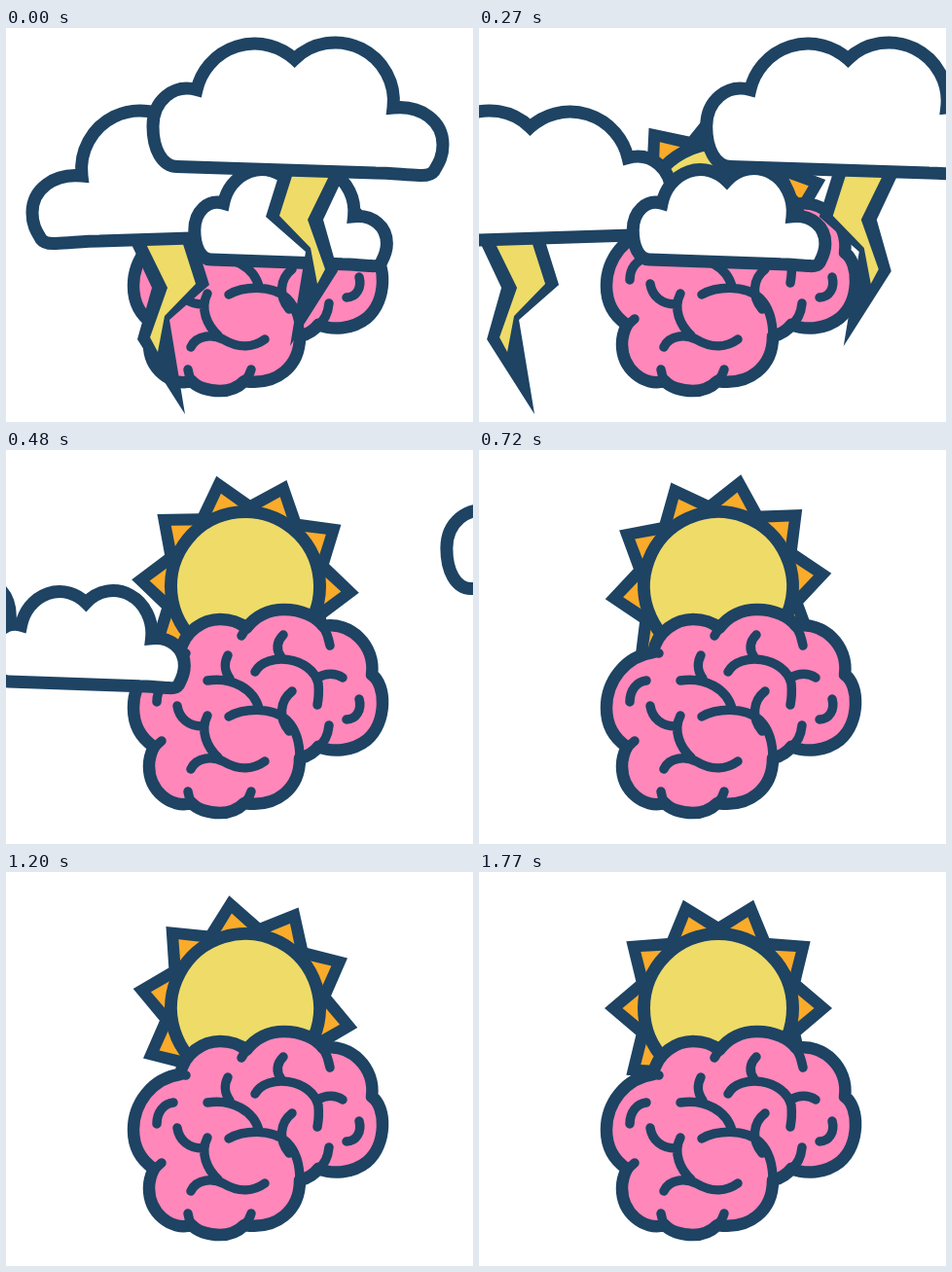
An HTML page with a canvas for the animation above (1.8 s loop, 480 by 405 pixels).

```html
<!DOCTYPE html>
<html lang="en">
<head>
<meta charset="utf-8">
<title>Brain weather</title>
<style>
html, body { margin: 0; width: 100%; height: 100%; overflow: hidden; background: #fff; }
canvas { display: block; }
</style>
</head>
<body>
<canvas id="stage" width="480" height="405"></canvas>
<script>
const ctx = document.getElementById('stage').getContext('2d');
const LOOP = 1800, STEP = 30;
const NAVY = '#1e4363', PINK = '#ff87b9', YELLOW = '#eedb68', ORANGE = '#faab2a';

const cloud = new Path2D(`M176 142.5C160 142 151 124 151 101C151 75 172 57 196 63.5
  A61 61 0 0 1 296.5 32A60 60 0 0 1 398 82C427 79 449 96 449 120
  C449 133 444 140 440 147C437 151 433 152 425 151.5C410 151 395 149 380 149Z`);
const smallCloud = new Path2D();
smallCloud.addPath(cloud, new DOMMatrix([0.663, 0, 0, 0.732, 93.7, 133.7]));

const boltEdge = new Path2D('M350 146L282 146L267 194L308 230L292 327L341 250L326 197Z');
const boltCore = new Path2D('M335 146L296 146L281 193L313 226L320 263L328 248L310 197Z');

const brain = new Path2D(`M179 208C183 186 203 174 220 174C231 174 240 177 247 183
  C257 170 271 164 286 164C303 164 319 171 326 181C354 176 380 201 376 231
  C391 241 392 280 371 298C356 310 335 311 321 305C316 312 309 315 302 317
  C302 348 278 368 245 363C238 370 230 373 220 373C207 373 196 369 191 363
  C169 369 147 350 147 325C147 317 149 311 152 305C140 297 131 284 131 265
  C131 238 150 212 179 208Z`);
const folds = new Path2D(`M179 208L185 209M242 191L247 183M326 181Q331 190 333 201
  M332 283C331 293 328 300 321 305M160 299Q154 304 152 308
  M187 351Q188 358 191 363M252 351Q250 358 245 363
  M228 211C224 219 224 226 230 235M207 237C233 233 255 246 260 266
  M285 190C278 197 277 205 283 213M256 228C268 207 314 212 321 240Q322 252 320 262
  M321 234C328 229 339 229 346 234
  M294 248C281 258 280 276 291 289M363 256C366 267 360 277 350 277
  M155 259C155 247 162 238 172 237M176 263C178 276 188 284 202 284
  M207 273C199 289 207 306 218 316
  M190 328C196 315 213 315 223 320C240 330 255 328 266 320
  M229 274C243 266 273 263 289 278C298 287 302 300 302 317`);

function ease(t, start, span) {
  const u = Math.min(1, Math.max(0, (t - start) / span));
  return u * u * (3 - 2 * u);
}

function outline(path, fill, width, join) {
  ctx.fillStyle = fill;
  ctx.fill(path);
  ctx.lineWidth = width;
  ctx.lineJoin = join;
  ctx.stroke(path);
}

function fillPoly(points, color) {
  ctx.beginPath();
  points.forEach(([x, y]) => ctx.lineTo(x, y));
  ctx.closePath();
  ctx.fillStyle = color;
  ctx.fill();
}

function drawSun(y, degrees) {
  ctx.save();
  ctx.translate(246, y);
  ctx.rotate(degrees * Math.PI / 180);
  const star = [];
  for (let i = 0; i < 20; i++) {
    const a = i * Math.PI / 10, r = i % 2 ? 89 : 117;
    star.push([r * Math.cos(a), r * Math.sin(a)]);
  }
  fillPoly(star, NAVY);
  for (let i = 0; i < 10; i++) {
    fillPoly([[98.5, 0], [81, 14.5], [81, -14.5]], ORANGE);
    ctx.rotate(Math.PI / 5);
  }
  const disc = new Path2D();
  disc.arc(0, 0, 76.5, 0, 2 * Math.PI);
  outline(disc, YELLOW, 13, 'round');
  ctx.restore();
}

function drawBrain() {
  outline(brain, PINK, 12.5, 'round');
  ctx.lineWidth = 9.5;
  ctx.stroke(folds);
}

function drawStorm(x, y, flip) {
  ctx.save();
  ctx.translate(x, y);
  ctx.scale(flip, 1);
  ctx.fillStyle = NAVY;
  ctx.fill(boltEdge);
  ctx.fillStyle = YELLOW;
  ctx.fill(boltCore);
  outline(cloud, '#fff', 13, 'miter');
  ctx.restore();
}

function drawSmallCloud(x) {
  ctx.save();
  ctx.translate(x, 0);
  outline(smallCloud, '#fff', 13, 'miter');
  ctx.restore();
}

function draw(t) {
  ctx.fillStyle = '#fff';
  ctx.fillRect(0, 0, 480, 405);
  ctx.strokeStyle = NAVY;
  ctx.lineCap = 'round';
  drawSun(230 - 90 * ease(t, 120, 355), (t - 1770) * 36 / 330);
  drawBrain();
  drawStorm(476 - 355 * ease(t, 60, 520), 70, -1);
  drawSmallCloud(-455 * ease(t, 150, 700));
  drawStorm(370 * ease(t, 117, 500), 0, 1);
}

const begin = performance.now();
function tick() {
  const t = (performance.now() - begin) % LOOP;
  draw(Math.floor(t / STEP) * STEP);
  requestAnimationFrame(tick);
}
tick();
</script>
</body>
</html>
```
